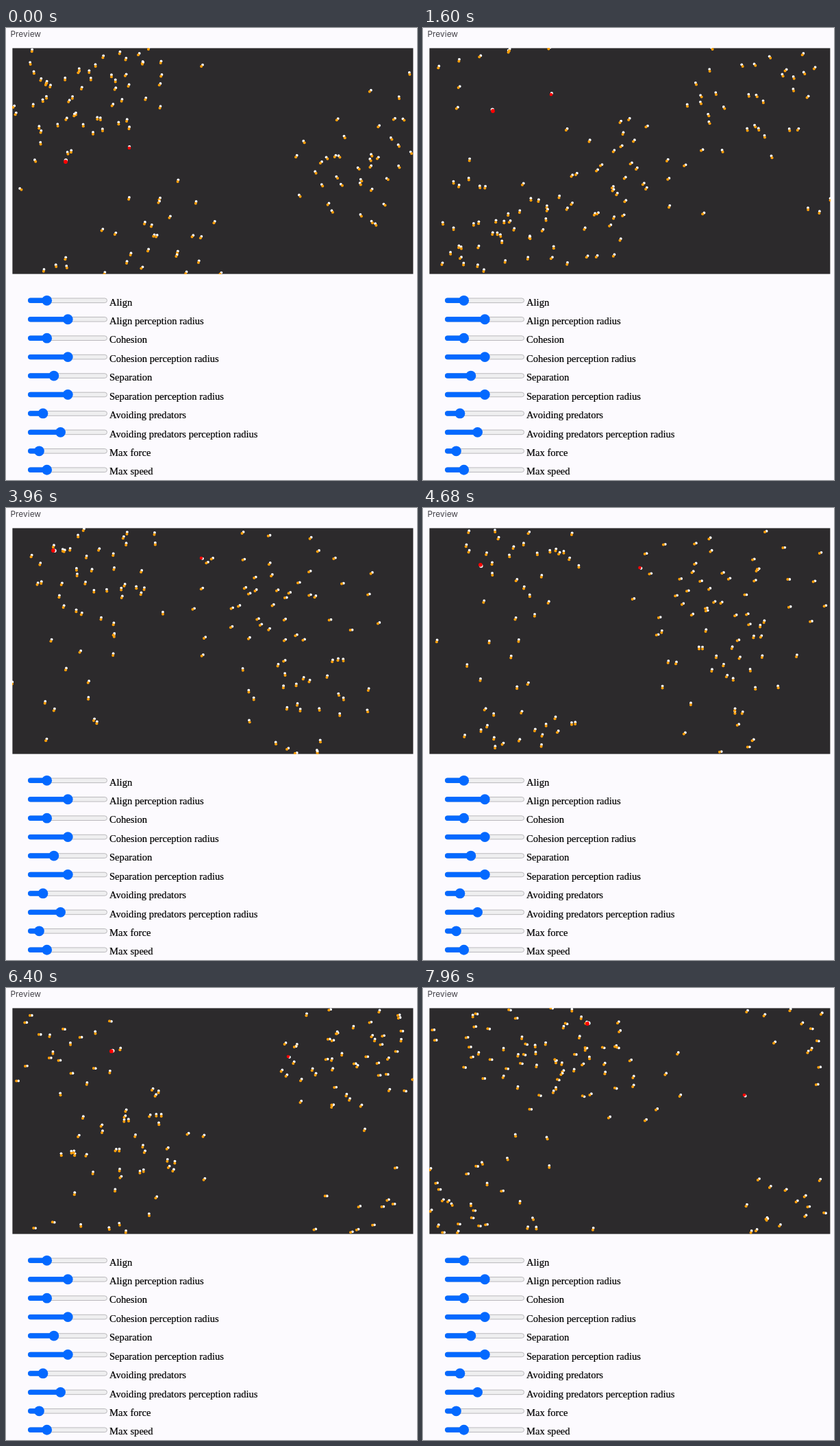
Recreate the animation shown at these times as an HTML page with a canvas. Size 600 by 659 pixels, loop 8000 ms.

```html
<!DOCTYPE html>
<html lang="en">
<head>
<meta charset="utf-8">
<title>Flocking preview</title>
<style>
  html, body { margin: 0; width: 100%; height: 100%; overflow: hidden; background: #fcfafe; }
  svg, canvas { position: absolute; left: 0; top: 0; }
  canvas { left: 9px; top: 29px; }
  .title { font: 11.9px Inter, "Open Sans", sans-serif; fill: #45434a; }
  .label { font: 14.6px "Liberation Serif", Times, serif; stroke: #000; stroke-width: .2px; }
</style>
</head>
<body>
<svg id="panel" width="600" height="659">
  <text class="title" x="6.5" y="13">Preview</text>
  <rect x="9.4" y="29.4" width="585" height="329.2" fill="#2c2a2c"/>
</svg>
<canvas id="field" width="586" height="330"></canvas>
<script>
const LOOP = 8000, STEP = 40, W = 586, H = 330, LEFT = 9, TOP = 29;

// Sliders: label and value from 0 to 1
const sliders = {
  'Align': .2, 'Align perception radius': .5,
  'Cohesion': .2, 'Cohesion perception radius': .5,
  'Separation': .3, 'Separation perception radius': .5,
  'Avoiding predators': .144, 'Avoiding predators perception radius': .395,
  'Max force': .09, 'Max speed': .2
};
document.getElementById('panel').innerHTML += Object.entries(sliders).map(([label, value], i) => {
  const x = 39.3 + value * 102, y = 397.3 + i * 27.44;
  return `<rect x="32.5" y="${y - 3.3}" width="115" height="6.6" rx="3.3" fill="#efeff0" stroke="#b4b3b6" stroke-width=".9"/>
    <rect x="32" y="${y - 3.7}" width="${x - 32}" height="7.4" rx="3.7" fill="#0469ff"/>
    <circle cx="${x}" cy="${y}" r="7.4" fill="#0469ff"/>
    <text class="label" x="151" y="${y + 7.2}">${label}</text>`;
}).join('');

// Each flock drifts from a start with a velocity and a steady turn (pixels, seconds)
const flocks = [
  { n: 17, from: [215, 315], speed: [30, -72], turn: [3, 4.2] },
  { n: 24, from: [105, 110], speed: [10, -85], turn: [0, 0] },
  { n: 12, from: [520, 170], speed: [60, -68], turn: [-4.5, 0] },
  { n: 27, from: [525, 215], speed: [-45, -67], turn: [6, 0] },
  { n: 14, from: [140, 75], speed: [40, -85], turn: [2.7, 5.5] },
  { n: 18, from: [85, 85], speed: [-9, -93], turn: [4.5, 1.8] },
  { n: 15, from: [245, 315], speed: [45, -75], turn: [3, 6] }
];

let seed = 7;
const random = () => (seed = seed * 16807 % 2147483647) / 2147483647;

const boids = flocks.flatMap(({ n, from, speed, turn }) => Array.from({ length: n }, (_, i) => {
  const r = ((i + .5) / n) ** .6, a = i * 2.4 + random() * .9;
  const phase = random() * 6.28, rate = .8 + random() * .7;
  const home = [r * 96 * Math.cos(a), r * 90 * Math.sin(a)];
  return t => [0, 1].map(k => from[k] + home[k] + speed[k] * t + turn[k] * t * t +
    14 * Math.sin(rate * t + phase * (k + 1)));
}));

// Predators swim through a few key points: [seconds, x, y]
const predators = [
  { r: 2.3, keys: [[0, 180, 175], [1.6, 187, 97], [2.92, 238, 54], [3.96, 285, 73], [5.48, 354, 100], [6.4, 412, 100], [7.96, 469, 156]] },
  { r: 2.9, keys: [[0, 87, 195], [1.6, 102, 121], [2.92, 56, 98], [3.96, 69, 62], [5.48, 109, 105], [7.96, 240, 52]] }
];

// Smooth curve through key points
function along(keys, t) {
  const last = keys.length - 1;
  let i = 0;
  while (i < last - 1 && t > keys[i + 1][0]) i++;
  const slope = (j, k) => {
    const p = keys[Math.max(j - 1, 0)], q = keys[Math.min(j + 1, last)];
    return (q[k] - p[k]) / (q[0] - p[0]);
  };
  const a = keys[i], b = keys[i + 1], d = b[0] - a[0], u = (t - a[0]) / d;
  return [1, 2].map(k => a[k] + (b[k] - a[k]) * u * u * (3 - 2 * u) +
    d * u * (1 - u) * (slope(i, k) * (1 - u) - slope(i + 1, k) * u));
}

const ctx = document.getElementById('field').getContext('2d');
const wrap = (v, size) => ((v % size) + size) % size;

function dot(x, y, r, color) {
  ctx.fillStyle = color;
  ctx.beginPath();
  ctx.arc(x, y, r, 0, 7);
  ctx.fill();
}

// Wrapped position and heading
function pose(move, t) {
  const [x, y] = move(t), [ax, ay] = move(t - .02), [bx, by] = move(t + .02);
  const a = Math.atan2(by - ay, bx - ax);
  return [wrap(x - LEFT, W), wrap(y - TOP, H), Math.cos(a), Math.sin(a)];
}

function draw(now) {
  const t = Math.floor(now % LOOP / STEP) * STEP / 1000;
  ctx.clearRect(0, 0, W, H);
  for (const move of boids) {
    const [x, y, dx, dy] = pose(move, t);
    dot(x + dx * 1.5, y + dy * 1.5, 1.9, '#fff');
    dot(x - dx * 1.4, y - dy * 1.4, 2, '#ff9f0a');
  }
  for (const { r, keys } of predators) {
    const [x, y, dx, dy] = pose(s => along(keys, s), t);
    dot(x + dx * 2, y + dy * 2, r - .2, '#fff');
    dot(x, y, r, '#f00');
  }
}

const start = performance.now();
(function tick() {
  draw(performance.now() - start);
  requestAnimationFrame(tick);
})();
</script>
</body>
</html>
```
